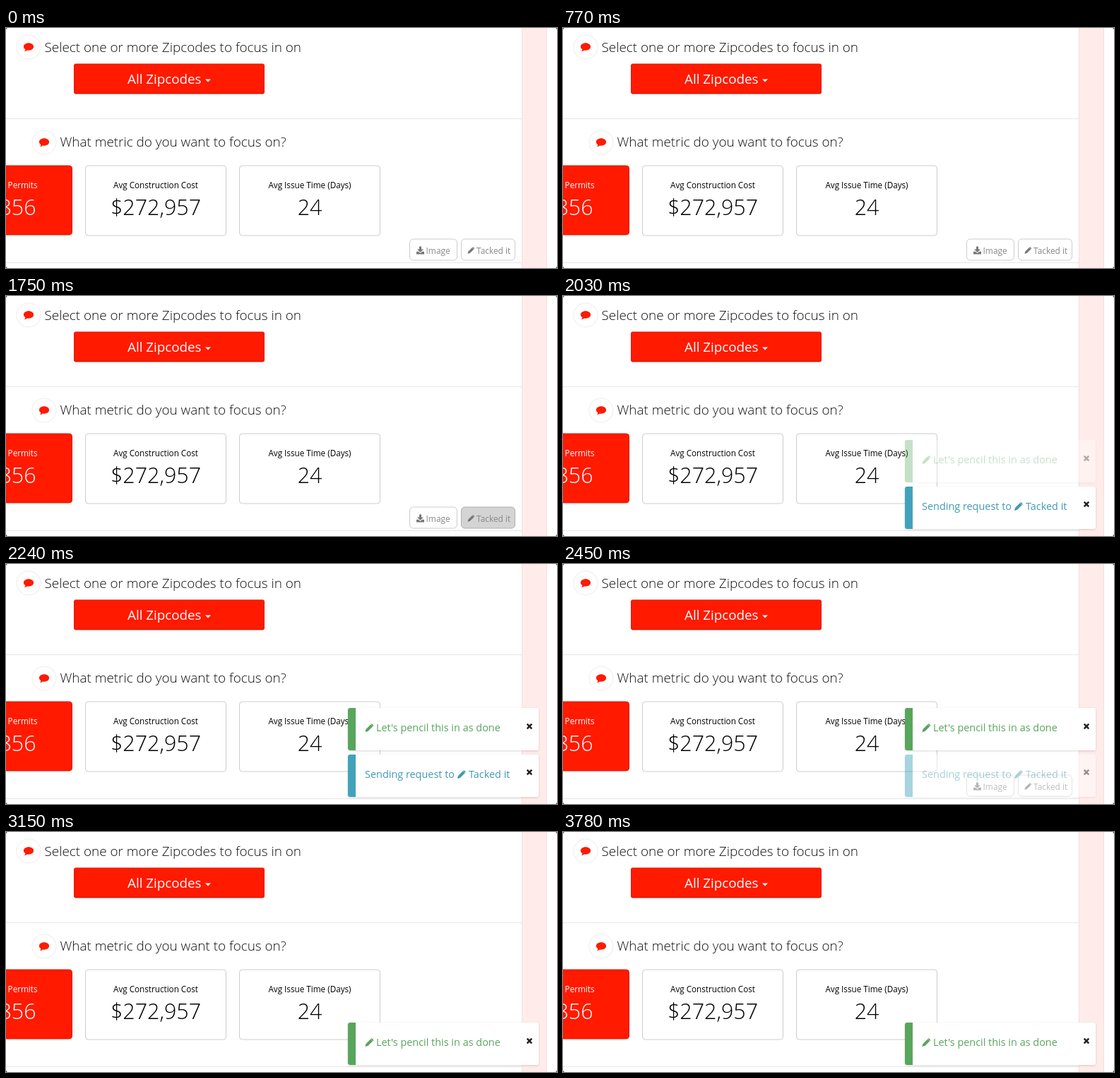
Write an HTML page that moves like this. It is 780 px wide and 340 px high and loops after 3.85 s.

```html
<!DOCTYPE html>
<html lang="en">
<head>
<meta charset="utf-8">
<title>Permit metrics</title>
<style>
  html, body { margin: 0; width: 100%; height: 100%; overflow: hidden; background: #fff; }
  svg { display: block; font-family: "Open Sans", sans-serif; }
  .heading { font-size: 18.9px; font-weight: 300; fill: #111; }
  .label { font-size: 11.7px; fill: #000; }
  .value { font-size: 30.4px; font-weight: 300; fill: #000; }
  .small { font-size: 11.9px; fill: #888; }
  .toast { font-size: 14.45px; }
  .mid { text-anchor: middle; }
  .card { fill: #fff; stroke: #ccc; }
  .red { fill: #ff1a00; stroke: #e61900; }
</style>
</head>
<body>
<svg width="780" height="340" viewBox="0 0 780 340">
  <defs>
    <g id="comment">
      <circle r="17" fill="#fff" stroke="#f3f3f3" stroke-width="1.5"/>
      <path transform="scale(.95)" fill="#ff1a00" d="M0-6C4.2-6 7.5-3.5 7.5-.4S4.2 5 0 5Q-1 5-2 4.8Q-4 6.5-6.5 6.6Q-5 5.3-4.8 3.6C-6.5 2.6-7.5 1.2-7.5-.4C-7.5-3.5-4.2-6 0-6Z"/>
    </g>
    <path id="pencil" d="M0 12L.9 8.2L7.8 1.3L10.7 4.2L3.8 11.1ZM8.5.6Q9.2-.1 9.9.6L11.4 2.1Q12 2.8 11.4 3.5L11 3.9L8.1 1Z"/>
    <path id="download" d="M4 0H7V4H10L5.5 8.3L1 4H4ZM0 7.2H3L5.5 9.6L8 7.2H11V11H0Z"/>
    <path id="close" d="M-3.3-3.3L3.3 3.3M3.3-3.3L-3.3 3.3" stroke="#222" stroke-width="2.5"/>
    <filter id="shadow" x="-5%" y="-15%" width="110%" height="135%">
      <feDropShadow dx="0" dy="1" stdDeviation="1.5" flood-opacity=".16"/>
    </filter>
  </defs>

  <rect width="780" height="340" fill="#fff"/>
  <rect x="730" width="36" height="340" fill="#ffecea"/>
  <path d="M730.5 0V340M765.5 0V340" stroke="#f3dfde"/>
  <path d="M0 128.5H730M0 332.5H730" stroke="#e6e6e6"/>

  <use href="#comment" x="32" y="27"/>
  <text class="heading" x="54.5" y="33.5">Select one or more Zipcodes to focus in on</text>
  <rect class="red" x="96.5" y="51" width="269" height="42" rx="2"/>
  <path d="M97 92.5H365" stroke="#d61800"/>
  <text x="172" y="79" font-size="18.8" fill="#fff">All Zipcodes</text>
  <path d="M282 72.5H290L286 76.5Z" fill="#fff"/>

  <use href="#comment" x="54" y="162"/>
  <text class="heading" x="76.5" y="168">What metric do you want to focus on?</text>

  <rect class="red" x="-105.5" y="195" width="199" height="98" rx="4"/>
  <text class="label" x="44.5" y="226.5" text-anchor="end" style="fill:#fff">Total Permits</text>
  <text class="value" x="42.5" y="264.5" text-anchor="end" style="fill:#fff">856</text>
  <rect class="card" x="112.5" y="195" width="199" height="99" rx="4"/>
  <text class="label mid" x="212" y="227">Avg Construction Cost</text>
  <text class="value mid" x="212" y="265">$272,957</text>
  <rect class="card" x="330.5" y="195" width="199" height="99" rx="4"/>
  <text class="label mid" x="430" y="227">Avg Issue Time (Days)</text>
  <text class="value mid" x="430" y="265">24</text>

  <rect class="card" x="571.5" y="299" width="67" height="30" rx="5"/>
  <use href="#download" x="581" y="309.5" fill="#777"/>
  <text class="small" x="594.5" y="319.5">Image</text>
  <rect class="card" id="doneButton" x="644.5" y="299" width="76" height="30" rx="5"/>
  <use href="#pencil" transform="translate(653.5 310) scale(.82)" fill="#777"/>
  <text class="small" x="666" y="319.5">Tacked it</text>

  <g id="doneToast" fill="#58a55c">
    <rect width="270" height="60" rx="3" fill="#fff" filter="url(#shadow)"/>
    <path d="M11 0H3Q0 0 0 3V57Q0 60 3 60H11Z"/>
    <use href="#pencil" x="24.5" y="22"/>
    <text class="toast" x="40" y="33">Let's pencil this in as done</text>
    <use href="#close" x="257" y="26"/>
  </g>
  <g id="sendToast" transform="translate(484 270)" fill="#43a2bb">
    <rect width="270" height="60" rx="3" fill="#fff" filter="url(#shadow)"/>
    <path d="M11 0H3Q0 0 0 3V57Q0 60 3 60H11Z"/>
    <g fill="#4199b1">
      <text class="toast" x="24" y="33">Sending request to</text>
      <use href="#pencil" x="155" y="22"/>
      <text class="toast" x="171" y="33">Tacked it</text>
    </g>
    <use href="#close" x="257" y="25"/>
  </g>
  <path d="M0 0H2L0 2ZM780 0V2L778 0ZM0 340V338L2 340ZM780 340H778L780 338Z" fill="#555"/>
</svg>
<script>
  const LOOP = 3850, STEP = 70;
  const [button, doneToast, sendToast] =
    ["doneButton", "doneToast", "sendToast"].map(id => document.getElementById(id));
  const ramp = (t, from, to) => Math.min(1, Math.max(0, (t - from) / (to - from)));

  function draw(t) {
    const pressed = t >= 1610 && t < 1820;
    const hovered = t >= 1400 && t < 1960;
    button.style.fill = pressed ? "#d4d4d4" : hovered ? "#e6e6e6" : "#fff";
    button.style.stroke = hovered ? "#adadad" : "#ccc";

    sendToast.setAttribute("opacity", ramp(t, 1790, 1990) * (1 - ramp(t, 2320, 2560)));
    doneToast.setAttribute("opacity", ramp(t, 1960, 2170));
    // The remaining toast drops into the freed slot.
    doneToast.setAttribute("transform", `translate(484 ${t < 3080 ? 204 : 270})`);
  }

  const start = performance.now();
  function tick() {
    const t = (performance.now() - start) % LOOP;
    draw(Math.floor(t / STEP) * STEP);
    requestAnimationFrame(tick);
  }
  tick();
</script>
</body>
</html>
```
